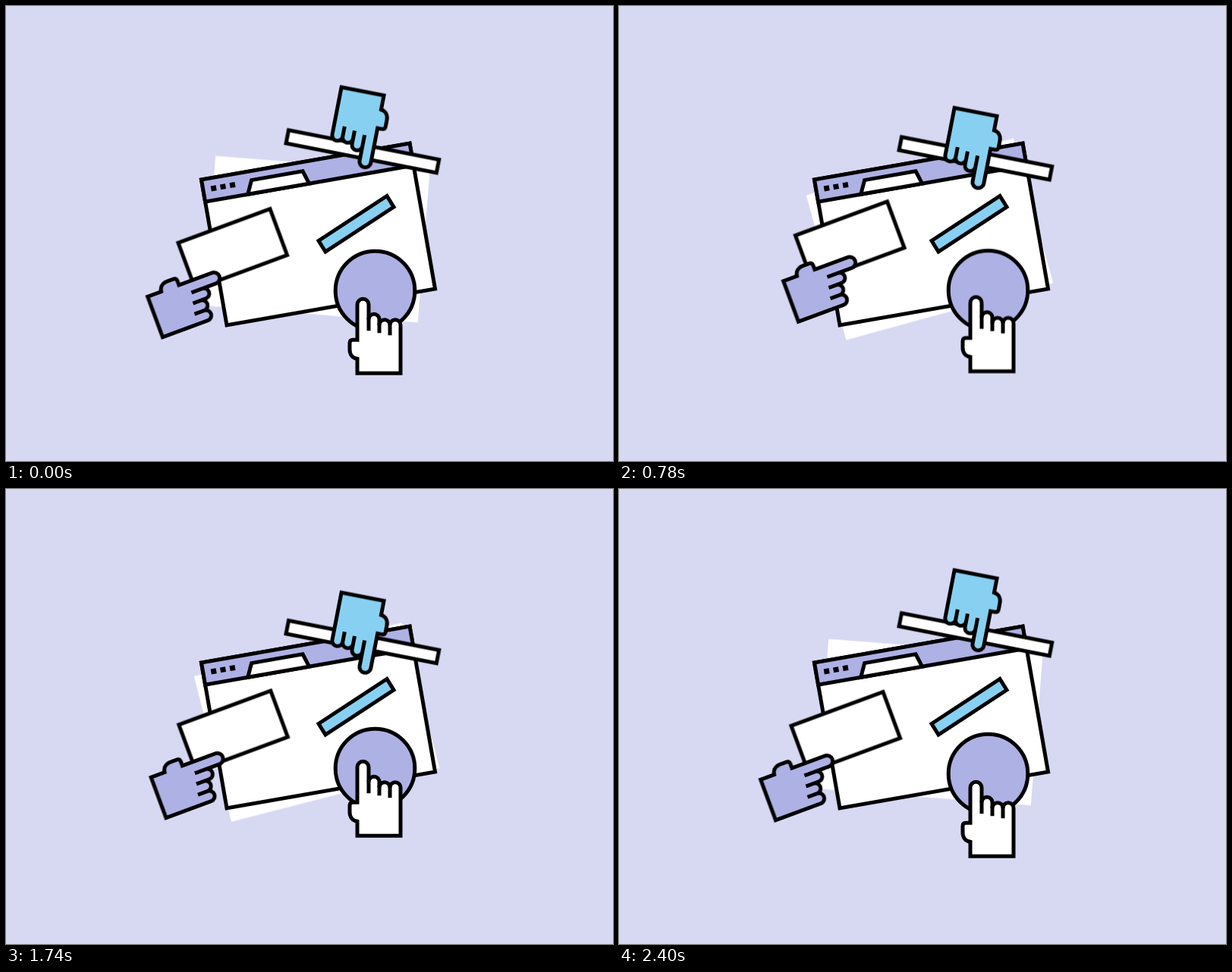
An HTML page without scripts for the animation above (2730 ms loop, 800 by 600 pixels).

```html
<!DOCTYPE html>
<html lang="en">
<head>
<meta charset="utf-8">
<title>Hands building a page</title>
<style>
  html, body { margin: 0; width: 100%; height: 100%; overflow: hidden; background: #d7d9f3; }
  svg { display: block; width: 800px; height: 600px; }

  .ink { stroke: #000; stroke-width: 5; }
  .white { fill: #fff; }
  .purple { fill: #aeb1e4; }
  .blue { fill: #88d0f1; }

  /* Each part leaves, waits at --to, and returns */
  .move { animation: 2730ms cubic-bezier(.333, 0, .667, 1) infinite; }
  .sheet { animation-name: turn; transform-origin: 409.5px 307.5px; }
  .card { animation-name: first; --to: translate(5.5px, -9.7px); }
  .card-hand { animation-name: first; --to: translate(30px, -20.5px); }
  .bar { animation-name: second; --to: translate(0, 12px); }
  .bar-hand { animation-name: second; --to: translate(0, 36px); }
  .disc { animation-name: third; --to: translate(0, -7px); }
  .disc-hand { animation-name: third; --to: translate(0, -27px); }

  @keyframes turn {
    0%, .9%, 87.4%, 100% { transform: rotate(4.5deg); }
    41.2%, 51.6% { transform: rotate(-21.4deg); }
  }
  @keyframes first {
    0%, 5.5%, 68.5%, 100% { transform: translate(0, 0); }
    25.1%, 49.1% { transform: var(--to); }
  }
  @keyframes second {
    0%, 15%, 78.8%, 100% { transform: translate(0, 0); }
    35%, 58.2% { transform: var(--to); }
  }
  @keyframes third {
    0%, 25%, 88.1%, 100% { transform: translate(0, 0); }
    44.2%, 68.75% { transform: var(--to); }
  }
</style>
</head>
<body>
<svg viewBox="0 0 800 600">
  <defs>
    <!-- Pointing hand, origin at the fingertip -->
    <g id="hand" class="ink">
      <path d="M-7.5 98V79C-14 78-17.5 73-17.5 67V58Q-17.5 54-13.5 54H-7.5V7.5A7.5 7.5 0 0 1 7.5 7.5V27A7 7 0 0 1 21.5 27V34.5A7 7 0 0 1 35.5 34.5A7 7 0 0 1 49.5 34.5V98Z"/>
      <path fill="none" d="M7.5 25V42M21.5 32V45M35.5 33V48"/>
    </g>
  </defs>

  <rect class="move sheet white" x="268" y="208.5" width="283" height="198"/>

  <g class="ink white" transform="translate(257.5 229) rotate(-9.9)">
    <rect width="278.7" height="194.8"/>
    <rect class="purple" width="278.7" height="29.5"/>
    <path d="M57 29.5L65 12H133.5L139 29.5Z"/>
    <path d="M10.5 14H17.5M23 14H30M35.7 14H42.7" stroke-width="7" style="stroke-width:7"/>
  </g>

  <path class="ink blue" d="M412 309.5L502 250.5L511 265L421 324Z"/>

  <g class="move card">
    <rect class="ink white" width="129" height="65" transform="translate(227 312.3) rotate(-20.3)"/>
  </g>
  <g class="move card-hand">
    <use href="#hand" class="purple" transform="translate(281.2 356.3) rotate(69.7)"/>
  </g>

  <g class="move bar">
    <rect class="ink white" width="202" height="17.7" transform="translate(372.5 163.7) rotate(11.1)"/>
  </g>
  <g class="move bar-hand">
    <use href="#hand" class="blue" transform="translate(472 212.7) rotate(191)"/>
  </g>

  <circle class="move disc ink purple" cx="486.5" cy="375.5" r="52.3"/>
  <g class="move disc-hand">
    <use href="#hand" class="white" transform="translate(470.5 386.3)"/>
  </g>
</svg>
</body>
</html>
```
